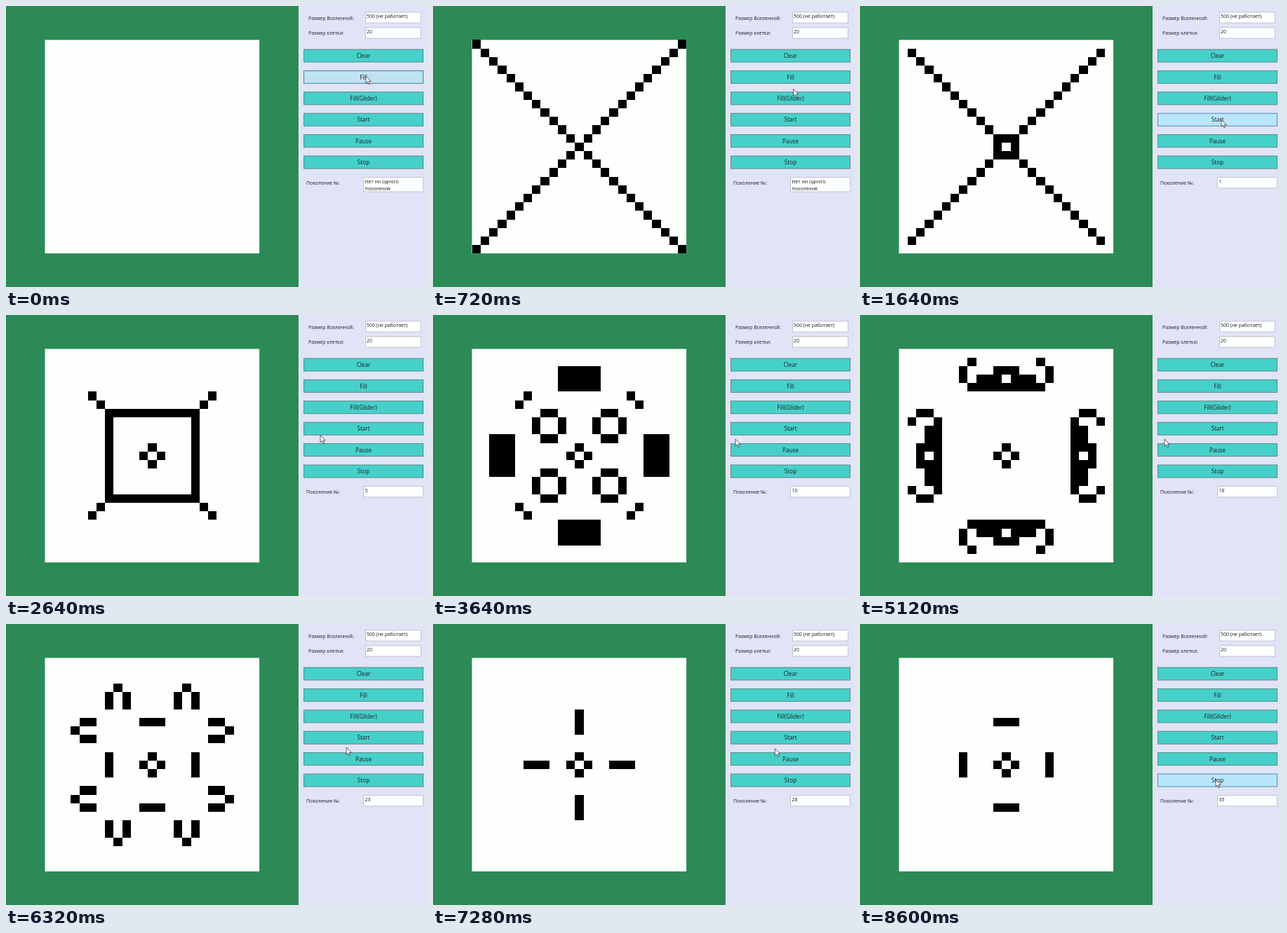
Write an HTML page that moves like this. It is 600x401 px and loops after 8640 ms.

```html
<!DOCTYPE html>
<html lang="ru">
<head>
<meta charset="utf-8">
<title>Life</title>
<style>
  html, body { margin: 0; width: 100%; height: 100%; overflow: hidden; background: #2b8a55; }
  svg { display: block; width: 600px; height: 401px; }
  text { font: 6.9px "Open Sans", "Noto Sans", sans-serif; fill: #1c1c22; }
  .button rect { fill: #45d1c9; stroke: #5f8585; }
  .button text { font-size: 8.2px; text-anchor: middle; }
  .button.hover rect { fill: #bae6fa; stroke: #4d8db8; }
  .button.pressed rect { fill: #c0e3f2; stroke: #4080a8; }
  .field { fill: #fdfffe; stroke: #b4b8c4; stroke-width: .8; }
</style>
</head>
<body>
<svg viewBox="0 0 600 401">
  <rect width="600" height="401" fill="#2b8a55"/>
  <rect x="55.5" y="48.4" width="305.6" height="304.7" fill="#fdfffd"/>
  <path id="cells" shape-rendering="crispEdges"/>
  <rect x="417" width="183" height="401" fill="#e1e4f6"/>
  <rect x="417" width="1" height="401" fill="#f0f2fa"/>

  <text x="431" y="19.6">Размер Вселенной:</text>
  <rect class="field" x="512.5" y="8.9" width="79" height="15.2"/>
  <text x="514" y="17.4">500 (не работает)</text>
  <text x="431" y="41.4">Размер клетки:</text>
  <rect class="field" x="512.5" y="30.9" width="79" height="15.2"/>
  <text x="514" y="39.2">20</text>

  <g id="buttons"></g>

  <text x="428" y="255.4">Поколение №:</text>
  <rect id="box" class="field" x="509.5" y="244.7" width="85" height="15.2"/>
  <text id="line1" x="511.5" y="253"></text>
  <text id="line2" x="511.5" y="262.6"></text>

  <path id="cursor" d="M0 0V10.2L2.3 8.1 4 12 5.7 11.2 4 7.5H7.2Z"
        fill="#fff" stroke="#33363c" stroke-width=".8" stroke-linejoin="round"/>
</svg>
<script>
  const LOOP = 8640, FILL = 120, START = 1625, STEP = 205;
  const N = 25, LAST = 35;
  const LEFT = 55.6, TOP = 48.4, CELL_W = 12.23, CELL_H = 12.2;
  const $ = id => document.getElementById(id);

  // Cursor stops: time, x, y
  const stops = [
    [0, 513, 100], [480, 513, 101], [1160, 515, 162], [1720, 515, 162],
    [2640, 448, 171.5], [3300, 431, 177], [4700, 431, 177], [5120, 434, 177],
    [6320, 485, 176], [7200, 487, 177], [8240, 507, 222], [LOOP, 507, 222]
  ];

  const buttons = ["Clear", "Fill", "Fill(Glider)", "Start", "Pause", "Stop"].map((label, i) => {
    const y = 62 + i * 30.4;
    $("buttons").insertAdjacentHTML("beforeend",
      `<g class="button"><rect x="424.5" y="${y}" width="170" height="18"/>` +
      `<text x="509.5" y="${y + 12.1}">${label}</text></g>`);
    return { y, node: $("buttons").lastChild };
  });

  const makeGrid = rule => Array.from({ length: N }, (_, r) =>
    Array.from({ length: N }, (_, c) => rule(r, c)));

  // Conway's rule; everything outside the field is dead
  function evolve(grid) {
    return makeGrid((r, c) => {
      let sum = 0;
      for (let y = r - 1; y <= r + 1; y++)
        for (let x = c - 1; x <= c + 1; x++)
          if ((y !== r || x !== c) && grid[y]?.[x]) sum++;
      return sum === 3 || (sum === 2 && grid[r][c]);
    });
  }

  function toPath(grid) {
    let d = "";
    grid.forEach((row, r) => row.forEach((alive, c) => {
      if (alive) d += `M${LEFT + c * CELL_W} ${TOP + r * CELL_H}h${CELL_W}v${CELL_H}h${-CELL_W}z`;
    }));
    return d;
  }

  const paths = [];
  let grid = makeGrid((r, c) => r === c || r + c === N - 1);
  for (let g = 0; g <= LAST; g++) {
    paths.push(toPath(grid));
    grid = evolve(grid);
  }

  function cursorAt(t) {
    const i = stops.findIndex(s => s[0] > t);
    const [t0, x0, y0] = stops[i - 1], [t1, x1, y1] = stops[i];
    const u = (t - t0) / (t1 - t0), k = u * u * (3 - 2 * u);
    return [x0 + (x1 - x0) * k, y0 + (y1 - y0) * k];
  }

  function draw(t) {
    const gen = t < START ? 0 : Math.min(LAST, Math.floor((t - START) / STEP) + 1);
    $("cells").setAttribute("d", t < FILL ? "" : paths[gen]);
    $("box").setAttribute("height", gen ? 15.2 : 20.3);
    $("line1").textContent = gen || "Нет ни одного";
    $("line2").textContent = gen ? "" : "поколения";

    const [x, y] = cursorAt(t);
    $("cursor").setAttribute("transform", `translate(${x} ${y})`);
    for (const b of buttons) {
      const over = y >= b.y && y < b.y + 18;
      b.node.setAttribute("class", "button" + (over ? (t < FILL ? " pressed" : " hover") : ""));
    }
  }

  const begin = performance.now();
  function tick() {
    draw((performance.now() - begin) % LOOP);
    requestAnimationFrame(tick);
  }
  tick();
</script>
</body>
</html>
```
